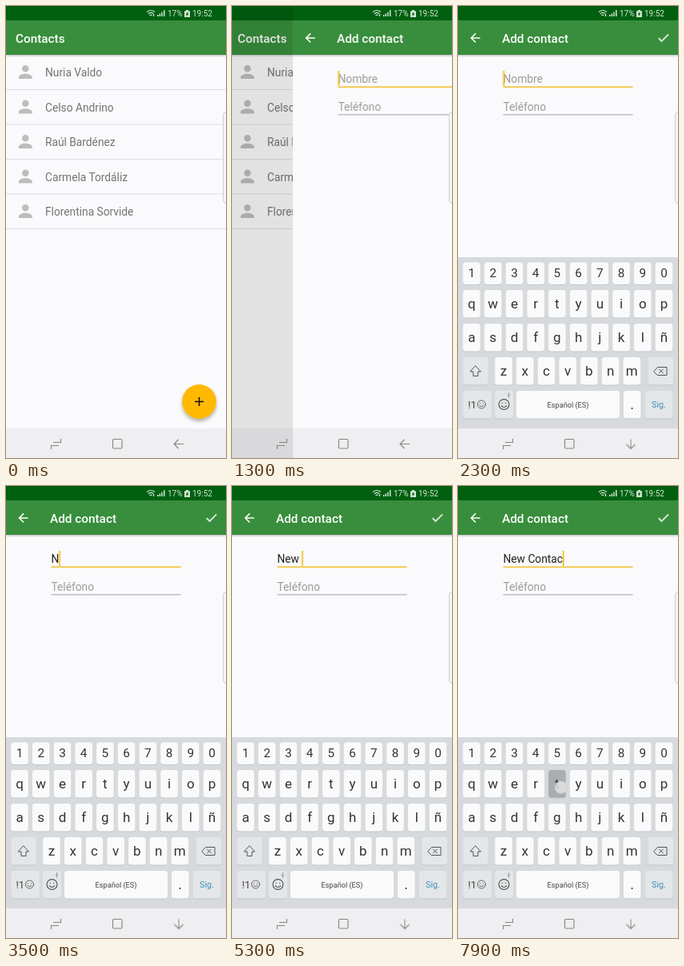
Recreate the animation shown at these times as an HTML page. Size 275 by 565 pixels, loop 8000 ms.

```html
<!DOCTYPE html>
<html lang="es">
<head>
<meta charset="utf-8">
<title>Contacts</title>
<style>
  html, body { margin: 0; width: 100%; height: 100%; overflow: hidden; background: #fafafa; }
  svg { display: block; width: 275px; height: 565px; font-family: Roboto, sans-serif; }
  text { white-space: pre; }
  .title { font-size: 15.3px; font-weight: 500; fill: #fff; }
  .body { font-size: 13.75px; }
  .mid { text-anchor: middle; }
  .line { fill: none; stroke: #555; stroke-width: 1; stroke-linecap: round; stroke-linejoin: round; }
  .nav { fill: none; stroke: #858585; stroke-width: 1.1; }
  #list { animation: shift 8s infinite; }
  #dim { animation: dim 8s infinite; }
  #form { animation: slide 8s infinite; }
  #keyboard { animation: rise 8s infinite; }
  #done { animation: appear 8s step-end infinite; }
  @keyframes shift { 0%, 12.5% { transform: translateX(0); animation-timing-function: ease } 21.25%, 100% { transform: translateX(-7px) } }
  @keyframes dim { 0%, 12.5% { opacity: 0; animation-timing-function: ease } 21.25%, 100% { opacity: .13 } }
  @keyframes slide { 0%, 12.5% { transform: translateX(275px); animation-timing-function: ease } 21.25%, 100% { transform: translateX(0) } }
  @keyframes rise { 0%, 23.5% { transform: translateY(214px); animation-timing-function: ease-out } 28.2%, 100% { transform: translateY(0) } }
  @keyframes appear { 0% { opacity: 0 } 21% { opacity: 1 } }
</style>
</head>
<body>
<svg viewBox="0 0 275 565">
  <defs>
    <filter id="shadow" x="-30%" y="-30%" width="160%" height="170%">
      <feDropShadow dx="0" dy="3" stdDeviation="2.2" flood-opacity=".3"/>
    </filter>
    <linearGradient id="fall" x2="0" y2="1">
      <stop stop-opacity=".22"/><stop offset="1" stop-opacity="0"/>
    </linearGradient>
    <g id="chrome">
      <rect width="275" height="565" fill="#faf9fb"/>
      <rect y="61" width="275" height="3" fill="url(#fall)"/>
      <rect y="18" width="275" height="43" fill="#388e3c"/>
      <rect width="275" height="18" fill="#00600f"/>
    </g>
    <path id="person" d="M12 12a4 4 0 1 0 0-8 4 4 0 0 0 0 8zm0 2c-2.7 0-8 1.34-8 4v2h16v-2c0-2.66-5.3-4-8-4z" fill="#bdbdbd"/>
    <g id="smiley" class="line">
      <circle r="5.6"/>
      <path d="M-2 -1.6v.4M2 -1.6v.4M-2.8 1.4Q0 4.6 2.8 1.4"/>
    </g>
  </defs>

  <rect width="275" height="565" fill="#faf9fb"/>
  <rect width="275" height="18" fill="#00600f"/>
  <rect y="18" width="275" height="43" fill="#388e3c"/>
  <g id="list">
    <use href="#chrome"/>
    <text class="title" x="12" y="46">Contacts</text>
    <g id="rows"></g>
    <g id="fab" filter="url(#shadow)"><circle cx="241.5" cy="494.5" r="21.4" fill="#ffb900"/></g>
    <path d="M236 494.5h11M241.500 489v11" stroke="#111" stroke-width="1.6"/>
  </g>
  <rect y="528" width="275" height="37" fill="#efeef0"/>
  <rect id="dim" width="275" height="565"/>

  <g id="form">
    <use href="#chrome"/>
    <path transform="translate(12.4 30.8) scale(.764)" fill="#fff" d="M20 11H7.830l5.590-5.590L12 4l-8 8 8 8 1.410-1.410L7.830 13H20z"/>
    <text class="title" x="55" y="46">Add contact</text>
    <path id="done" transform="translate(247.600 30.500) scale(.764)" fill="#fff" d="M9 16.170L4.830 12l-1.420 1.410L9 19 21 7l-1.410-1.410z"/>
    <text id="hint" class="body" x="56.500" y="95.500" fill="#9b9b9b">Nombre</text>
    <text id="name" class="body" x="56.500" y="95.500" fill="#222"></text>
    <rect x="56.500" y="100.500" width="162" height="1.500" fill="#f0c030"/>
    <rect id="caret" x="-.3" y="81" width="1.900" height="19" fill="#f0c030"/>
    <text class="body" x="56.500" y="130.500" fill="#9b9b9b">Teléfono</text>
    <rect x="56.500" y="135.300" width="162" height="1.100" fill="#aaa8ad"/>
    <g id="keyboard">
      <rect y="314" width="275" height="214" fill="#d7dadd"/>
      <g id="keys"></g>
      <g id="lower"></g>
      <g id="upper"></g>
      <path id="arrow" class="line" d="M22 450l6.500 7h-3.500v5.500h-6v-5.500h-3.500z"/>
      <path class="line" d="M245 456.500l4.500-5h11.500v10h-11.500zM251.500 454l5 5M256.500 454l-5 5"/>
      <text x="12.500" y="502.500" font-size="13" fill="#444">!1</text>
      <use href="#smiley" transform="translate(29.500 498) scale(.9)"/>
      <use href="#smiley" transform="translate(57.500 498) scale(1.150)"/>
      <path d="M63.500 483.500v3M61.800 486q1.700 3 3.400 0M63.500 487.500v2" class="line" style="stroke:#999"/>
      <text class="mid" x="137.500" y="501.500" font-size="9.200" fill="#444">Español (ES)</text>
      <text class="mid" x="217.500" y="504" font-size="18" fill="#333">.</text>
      <text class="mid" x="251" y="502" font-size="10.700" fill="#3d91bd">Sig.</text>
    </g>
    <rect y="528" width="275" height="37" fill="#efeef0"/>
  </g>

  <g fill="#d3e4d5">
    <g fill="none" stroke="#d3e4d5" stroke-width="1.100">
      <path d="M176 7.500q5-4 10 0M177.800 9.700q3.200-2.600 6.400 0M179.500 11.700q1.500-1.200 3 0"/>
    </g>
    <path d="M184 13v-3h1.200v3zM189 13v-2h1.500v2zM191.600 13v-3.500h1.500v3.500zM194.200 13v-5.500h1.500v5.500zM197 13v-8h1.500v8z"/>
    <text x="202" y="13.200" font-size="10">17%</text>
    <path d="M225 5h3v1.200h2v7.800h-7v-7.800h2z"/>
    <path d="M227.500 7l-3 3.500h1.600l-.6 2.500 3-3.500h-1.600z" fill="#00600f"/>
    <text x="233" y="13.200" font-size="10">19:52</text>
  </g>
  <rect x="271.500" y="132.500" width="9" height="114" rx="3.500" fill="#f5f4f6" stroke="#d0d0d2"/>
  <g class="nav">
    <path d="M59 545.500h9.500v-4.500M66 549.500h-9.500v4.500"/>
    <rect x="133.500" y="541.500" width="11.500" height="11.500" rx="1.500"/>
    <path id="back" d="M222 547.500h-12M215.500 542l-5.500 5.500 5.500 5.500"/>
  </g>
  <circle id="touch" r="8" fill="#e4e4e4" fill-opacity=".8" stroke="#bbb" stroke-opacity=".5"/>
</svg>

<script>
const LOOP = 8000;
const $ = id => document.getElementById(id);

function add(parent, tag, attrs = {}, content = '') {
  const el = document.createElementNS('http://www.w3.org/2000/svg', tag);
  for (const key in attrs) el.setAttribute(key, attrs[key]);
  el.textContent = content;
  return parent.appendChild(el);
}

// Stepped animation from [time, value] pairs; each value holds until the next.
function hold(el, prop, steps) {
  const frames = steps.map(([time, value]) =>
    ({ offset: time / LOOP, [prop]: value, easing: 'step-end' }));
  el.animate(frames, { duration: LOOP, iterations: Infinity });
}

['Nuria Valdo', 'Celso Andrino', 'Raúl Bardénez', 'Carmela Tordáliz', 'Florentina Sorvide'].forEach((name, i) => {
  const y = 83 + i * 43.5;
  add($('rows'), 'use', { href: '#person', transform: `translate(11.6 ${y - 13.2}) scale(1.06)` });
  add($('rows'), 'text', { class: 'body', x: 49, y: y + 5, fill: '#747474' }, name);
  add($('rows'), 'rect', { y: y + 21, width: 275, height: 1, fill: '#dedde0' });
});

const keys = {};
function addKey(id, x, y, width, height, fill = '#fafafb') {
  add($('keys'), 'rect', { x, y: y + 1, width, height, rx: 3.5, fill: '#c3c7ca' });
  const el = add($('keys'), 'rect', { x, y, width, height, rx: 3.5, fill });
  keys[id] = { el, fill, x: x + width / 2, y: y + height / 2, taps: [] };
}

[['1234567890', 17, 320.5, 27.5, 15.3], ['qwertyuiop', 17, 355, 34.5, 17], ['asdfghjklñ', 17, 397, 34.5, 17], ['zxcvbnm', 57, 439, 34.5, 17]]
  .forEach(([row, x0, y, height, size]) => [...row].forEach((char, i) => {
    const x = x0 + i * 26.72;
    addKey(char, x - 10.8, y, 21.6, height);
    const label = { class: 'mid', x, y: y + height / 2 + size * .34, 'font-size': size, fill: '#333' };
    add($('lower'), 'text', label, char);
    add($('upper'), 'text', label, char.toUpperCase());
  }));

const SOFT = '#e4e6e8';
addKey('shift', 6.2, 439, 31.5, 34.5, SOFT);
addKey('delete', 237.5, 439, 31.5, 34.5, SOFT);
addKey('symbols', 6.2, 481, 36, 34.5, SOFT);
addKey('emoji', 46, 481, 23, 34.5, SOFT);
addKey('space', 73, 481, 129, 34.5);
addKey('dot', 207, 481, 21.6, 34.5);
addKey('next', 233.5, 481, 35, 34.5, SOFT);

// [press, release, key]
const taps = [
  [2700, 2880, 'shift'], [3180, 3480, 'n'], [3780, 4080, 'e'], [4180, 4330, 'w'],
  [4980, 5180, 'space'], [5480, 5680, 'shift'], [5880, 6080, 'c'], [6280, 6430, 'o'],
  [6580, 6780, 'n'], [7080, 7280, 't'], [7330, 7480, 'a'], [7530, 7680, 'c'], [7780, 8000, 't']
];

const place = [[0, 'translate(243px, 497px)']];
const shown = [[0, 0], [880, 1], [1060, 0]];
for (const [press, release, id] of taps) {
  const key = keys[id];
  place.push([press, `translate(${key.x + 5}px, ${key.y + 4.5}px)`]);
  shown.push([press, 1], [release, 0]);
  key.taps.push([press, '#a9adb1'], [release, key.fill]);
}
hold($('touch'), 'transform', place);
hold($('touch'), 'opacity', shown);
for (const key of Object.values(keys))
  if (key.taps.length) hold(key.el, 'fill', [[0, key.fill], ...key.taps]);

// Each letter shows when its key is released, and the caret moves behind it.
const typed = taps.filter(tap => tap[2] !== 'shift').map(tap => tap[1]);
const letters = [...'New Contac'].map(char => add($('name'), 'tspan', {}, char));
const caretPath = [[0, 'translateX(56.5px)']];
letters.forEach((letter, i) => {
  hold(letter, 'fillOpacity', [[0, 0], [typed[i], 1]]);
  caretPath.push([typed[i], `translateX(${$('name').getEndPositionOfChar(i).x}px)`]);
});
hold($('caret'), 'transform', caretPath);
hold($('caret'), 'opacity', [0, 1400, 1880, 2380, 2880, 3380, 3480, 3980, 4080, 4780, 5180, 5680, 6080]
  .map((time, i) => [time, 1 - i % 2]));
hold($('hint'), 'opacity', [[0, 1], [typed[0], 0]]);

const caps = (on, off) => [[0, off], [2880, on], [3480, off], [5680, on], [6080, off]];
hold($('upper'), 'opacity', caps(1, 0));
hold($('lower'), 'opacity', caps(0, 1));
hold($('arrow'), 'fill', caps('#3d91bd', 'none'));
hold($('arrow'), 'stroke', caps('#3d91bd', '#555'));

$('back').style.transformOrigin = '216px 547.5px';
hold($('back'), 'transform', [[0, 'rotate(0deg)'], [1980, 'rotate(-90deg)']]);
</script>
</body>
</html>
```
